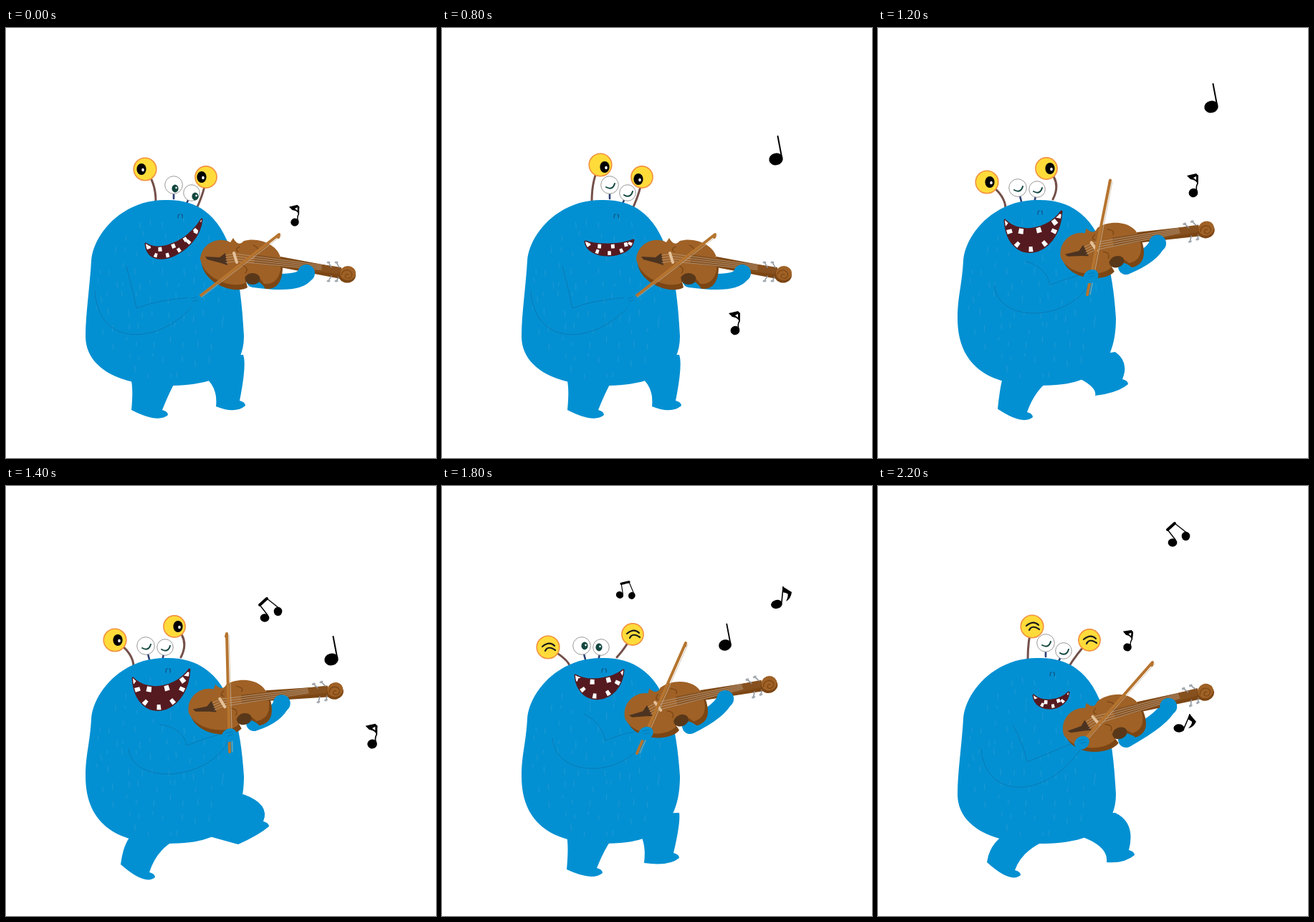
These frames come from a looping animation (600 px wide and 600 px high, 2.4 s). An HTML page:

```html
<!DOCTYPE html>
<html lang="en">
<head>
<meta charset="utf-8">
<title>Monster fiddler</title>
<style>
html, body { margin: 0; width: 100%; height: 100%; overflow: hidden; background: #fff; }
svg { display: block; width: 100vw; height: 100vh; }
</style>
</head>
<body>
<svg id="stage" viewBox="0 0 600 600"></svg>
<script>
const STEP = 200;
const BLUE = '#0390d2', LINE = '#0a7ab6', WOOD = '#9f6126', DARK_WOOD = '#7c4614', LIPS = '#551a20';

const fill = (d, color) => `<path d="${d}" fill="${color}"/>`;
const line = (d, color, w = 1) =>
  `<path d="${d}" fill="none" stroke="${color}" stroke-width="${w}" stroke-linecap="round" stroke-linejoin="round"/>`;
const oval = (x, y, rx, ry, color, more = '') =>
  `<ellipse cx="${x}" cy="${y}" rx="${rx}" ry="${ry}" fill="${color}" ${more}/>`;

// Blend of two numbers, lists or poses.
function mix(a, b, t = .5) {
  if (typeof a === 'number') return a + (b - a) * t;
  if (Array.isArray(a)) return a.map((v, i) => mix(v, b[i], t));
  return Object.fromEntries(Object.keys(a).map(k => [k, mix(a[k], b[k], t)]));
}

// side: 0 faces right, 1 faces front; feet: heel and toe; bow: frog and tip;
// grip: place along the bow; violin: centre and turn; hold: place along the neck
const rest = { side: 0, feet: [[175, 533], [226, 540], [293, 528], [334, 527]], shoulder: [168, 333], elbow: [182, 391],
  violin: [327, 330, 0], hold: 92, bow: [267, 377, 381, 288], grip: -.04 };
const play = { side: 1, feet: [[174, 535], [224, 540], [282, 526], [331, 519]], shoulder: [198, 318], elbow: [228, 355],
  violin: [311, 314, -19.5], hold: 85, bow: [272, 373, 340, 219], grip: .18 };
const kick = { side: 1, feet: [[160, 528], [208, 546], [324, 500], [367, 475]], shoulder: [215, 333], elbow: [252, 362],
  violin: [311, 310, -14.5], hold: 73, bow: [312, 371, 308, 206], grip: .14 };
const walk = { side: 0, feet: [[152, 525], [199, 543], [319, 525], [358, 515]], shoulder: [188, 333], elbow: [208, 385],
  violin: [314, 333, -22.8], hold: 94, bow: [290, 352, 383, 246], grip: -.06 };
const swing = mix(play, kick), turn = mix(kick, walk);

// Mouth: two corners, sag of the upper and of the lower lip.
const grin = [195, 301, 273, 267, 17, 33], calm = [200, 298, 267, 296, 5, 20], wide = [178, 274, 259, 263, 11, 40],
  huge = [177, 268, 256, 256, 18, 50], glad = [186, 264, 253, 257, 9, 36], small = [217, 292, 266, 288, 9, 20];

// Gaze: pupil shift of the left eye, of the right eye, and down; null is shut.
const crossed = [6, -5, 3], ahead = [4, 5, 0], low = [2, 5, 5], inward = [4, -3, 0];
const aside = [152, 215, 235, 196], perked = [221, 191, 279, 208], spread = [148, 225, 266, 207];

const lone = [['flagL', 403, 271, .9, 0]];
const pair = [['quarter', 466, 183, 1, 0], ['flagL', 409, 422, 1, 0]];

// pose, mouth, big eyes, their gaze, small eyes' gaze, notes [kind, x, y, size, turn]
const steps = [
  [rest, grin, [194, 197, 279, 208], [-5, -6, 0], low, lone],
  [walk, grin, perked, crossed, low, pair],
  [rest, grin, [235, 189, 302, 228], [3, 4, 3], low, lone],
  [walk, calm, perked, crossed, null, pair],
  [rest, calm, perked, crossed, null, pair],
  [play, wide, aside, ahead, null, [['quarter', 429, 143, 1, 0], ['flagL', 308, 203, .8, 0]]],
  [swing, huge, aside, ahead, null, [['quarter', 465, 110, 1, 0], ['flagL', 440, 230, 1, 0]]],
  [kick, huge, aside, ahead, null, [['quarter', 454, 242, 1, 0], ['flagL', 511, 360, 1.05, 0], ['double', 361, 184, 1, 0]]],
  [swing, wide, aside, ahead, null, [['quarter', 425, 232, 1, 0], ['flagR', 475, 260, 1, 0], ['double', 303, 184, 1, 0]]],
  [play, glad, spread, null, inward, [['quarter', 395, 222, .92, 0], ['flagR', 467, 165, 1, 0], ['double', 248, 152, .82, 29]]],
  [turn, glad, spread, null, inward, [['flagR', 558, 200, 1, 0], ['double', 46, 172, 1, 20]]],
  [walk, small, [215, 196, 295, 215], null, null, [['flagL', 348, 225, .9, 5], ['flagR', 420, 338, .95, 18], ['double', 411, 79, 1, 0]]]
];

const shapes = {
  quarter: oval(0, 0, 9.8, 8.3, '#000', 'transform="rotate(-15)"') + line('M8,-3L2.5,-32', '#000', 2),
  flagL: oval(0, 0, 6.4, 6.2, '#000', 'transform="rotate(-20)"') +
    line('M5,-2Q3,-8 6,-13V-24', '#000', 1.6) + fill('M-9,-24L4,-27L7,-24L6,-11Q5,-18 -4,-19Z', '#000') +
    fill('M0,-21L4,-23V-18Z', '#fff'),
  flagR: oval(0, 0, 8, 6, '#000', 'transform="rotate(-15)"') +
    line('M7,-3L9,-24', '#000', 1.6) + fill('M8,-25Q16,-20 21,-17Q20,-8 13,-4Q17,-12 15,-15L8,-17Z', '#000'),
  double: oval(0, 0, 6.4, 5.8, '#000') + oval(18.5, -9, 5.8, 6.2, '#000') +
    line('M4,-4L-7,-18L3,-27L22,-12', '#000', 1.4) + line('M-7,-18L3,-27', '#000', 4)
};
const note = ([kind, x, y, s, r]) =>
  `<g transform="translate(${x} ${y}) rotate(${r}) scale(${s})">${shapes[kind]}</g>`;

// Fur: short strokes on a loose grid, kept inside the belly.
let seed = 7;
const rnd = () => (seed = seed * 16807 % 2147483647) / 2147483647;
let hairs = '';
for (let y = 262; y < 490; y += 21) {
  for (let x = 122; x < 325; x += 19) {
    const hx = x + rnd() * 14, hy = y + rnd() * 14, len = 4 + rnd() * 5;
    if (((hx - 221) / 97) ** 2 + ((hy - 372) / 116) ** 2 < 1) hairs += `M${hx},${hy}l${rnd() * 2 - 1},${len}`;
  }
}
const fur = line(hairs, '#259bd4', .8);

// Egg-shaped trunk; the belly sits higher when facing front.
function trunk(side) {
  const belly = 430 - 25 * side;
  return fill(`M222,240C300,238 326,305 332,${belly}C332,485 285,499 225,499` +
    `C160,499 111,475 111,${belly}C111,${belly - 30} 117,360 119,325C121,290 160,240 222,240Z`, BLUE);
}
function leg([bx, by], [fx, fy], [hx, hy], [tx, ty]) {
  const ax = tx - 8, ay = ty - 7;
  return fill(`M${bx},${by}Q${hx + 3},${by + 14} ${hx},${hy}Q${tx - 14},${ty + 12} ${tx},${ty}` +
    `Q${tx},${ty - 5} ${ax},${ay}Q${ax + 10},${fy + 14} ${fx},${fy}L${bx + 20},${by - 30}Z`, BLUE);
}
const legs = ([heelL, toeL, heelR, toeR]) =>
  leg([174, 488], [236, 494], heelL, toeL) +
  leg([277, 487], [331, Math.min(456, toeR[1] - 45)], heelR, toeR);

const wood = 'M271,322C273,300 297,290 313,299L317,293Q324,306 332,297C352,291 383,302 384,326' +
  'C384,350 374,358 360,357Q350,340 333,347L335,355C320,365 276,352 271,322Z';
let strings = '', pegs = '';
for (let i = 0; i < 4; i++) {
  const px = 454 + 11 * (i % 2), up = i < 2 ? -1 : 1, tip = px - 4, ty = 340 + 13 * up;
  strings += `M307,${317 + i * 3.5}L320,${315 + i * 3.5}L440,${331 + i * 2}`;
  pegs += line(`M${px},${340 + 6 * up}L${tip},${ty}`, '#8c9298', 1.5) + oval(tip, ty, 2.6, 1.6, '#a4aab0');
}
const fiddle =
  `<g transform="translate(2 7)">${fill(wood, DARK_WOOD)}</g>` + fill(wood, WOOD) +
  oval(344, 350, 10.5, 8, '#59381a') +
  line('M326,305Q318,309 324,312M330,331Q340,336 334,342M345,303Q355,308 350,312', DARK_WOOD, 1.3) +
  fill('M383,319L468,335L467,350L383,334Z', DARK_WOOD) +
  fill('M348,316L468,334L467,344L346,328Z', '#87511f') +
  fill('M278,319L298,320L306,314L309,331L300,328L281,323Z', '#4c3320') +
  line(strings, '#b89c80', .8) + line('M318,314L322,327', '#e4c199', 4) + pegs +
  oval(476, 345, 12, 10.5, DARK_WOOD) + oval(477, 342, 11, 10, WOOD) +
  line('M468,344Q470,337 477,338Q485,341 482,347Q477,352 473,347Q474,342 478,344', DARK_WOOD, 1.2);

function music({ shoulder: [sx, sy], elbow: [ex, ey], violin: [vx, vy, deg], hold, bow, grip }) {
  const a = deg * Math.PI / 180, [x1, y1, x2, y2] = bow;
  const fx = vx + hold * Math.cos(a) - 12 * Math.sin(a), fy = vy + hold * Math.sin(a) + 12 * Math.cos(a);
  const gx = mix(x1, x2, grip), gy = mix(y1, y2, grip), px = sx - 44, py = sy + 34;
  return line(`M${sx},${sy}Q${ex - 5},${ey - 25} ${ex},${ey}Q${ex + 30},${ey - 12} ${gx},${gy - 5}` +
      `M${px},${py}C${px + 5},${ey + 55} ${ex + 30},${ey + 52} ${gx},${gy + 6}`, LINE) +
    line(`M346,${vy + 21}Q${fx - 8},${fy + 18} ${fx},${fy}`, BLUE, 22) +
    `<g transform="translate(${vx - 327} ${vy - 330}) rotate(${deg} 327 330)">${fiddle}</g>` +
    oval(fx, fy, 12, 12, BLUE) +
    line(`M${x1 + 4},${y1}L${x2 + 3},${y2 + 2}`, '#c9b79c', .8) +
    line(`M${x1},${y1}L${x2},${y2}l-1,4`, '#b5742f', 4) +
    oval(gx, gy, 11, 9, BLUE, `transform="rotate(-30 ${gx} ${gy})"`) +
    line(`M${gx - 4},${gy - 3}l8,-2m-6,6l7,-2`, LINE);
}

function bigEye(x, y, r, dx, dy) {
  const face = oval(x, y, r, r, '#ffdb3a', 'stroke="#f2913f" stroke-width="1.6"');
  if (dx === undefined)
    return face + line(`M${x - 8},${y - 1}Q${x + 2},${y - 9} ${x + 9},${y - 2}M${x - 4},${y + 5}Q${x},${y - 3} ${x + 10},${y + 4}`, '#1a1a1a', 2.2);
  return face + oval(x + dx, y + dy, 6.6, 8, '#000') + oval(x + dx + 2, y + dy + 1, 1.8, 2.2, '#fff');
}
function smallEye(x, y, r, dx, dy) {
  const face = oval(x, y, r, r, '#fff', 'stroke="#999" stroke-width="1"');
  if (dx === undefined) return face + line(`M${x - 5},${y + 3}Q${x + 4},${y + 8} ${x + 7},${y - 2}`, '#12463f', 2);
  return face + oval(x + dx, y + dy, 4.6, 5.4, '#12463f') + oval(x + dx + 1.5, y + dy - 1, 1.2, 1.4, '#fff');
}
function eyes(side, big, gaze, peek) {
  const roots = mix([209, 242, 265, 254], [178, 252, 244, 239], side);
  const white = mix([234, 219, 259, 230], [195, 223, 222, 225], side);
  let stalks = '', balls = '';
  for (const i of [0, 1]) {
    const [bx, by, x, y, wx, wy] = [roots, big, white].flatMap(p => [p[2 * i], p[2 * i + 1]]);
    const lean = mix(i ? -9 : 0, i ? -4 : 5, side);
    stalks += line(`M${bx},${by}Q${bx + 13 * i},${y + 18} ${x},${y}`, '#74504a', 3) +
      line(`M${wx},${wy}L${wx + lean},${wy + 19}`, '#2d3f74', 2.6);
    balls += smallEye(wx, wy, 12.3 - i, peek?.[i], peek?.[2]) + bigEye(x, y, 15.8 - i * .7, gaze?.[i], gaze?.[2]);
  }
  return stalks + balls;
}

// Crescent with square teeth dashed along its edge.
function smile([x1, y1, x2, y2, up, down]) {
  const lip = (t, sag) => `${mix(x1, x2, t)},${mix(y1, y2, t) + sag / .75}`;
  const d = `M${x1},${y1}C${lip(.25, up)} ${lip(.75, up)} ${x2},${y2}C${lip(.95, down)} ${lip(.05, down)} ${x1},${y1}Z`;
  const tooth = 3.5 + (down - up) / 12;
  return `<clipPath id="lips"><path d="${d}"/></clipPath>` + fill(d, LIPS) + line(d, LIPS, 3) +
    `<path d="${d}" clip-path="url(#lips)" fill="none" stroke="#fff" stroke-width="${tooth * 2.4}" stroke-dasharray="${tooth} ${tooth * 2.8}"/>`;
}

function scene([pose, mouth, big, gaze, peek, notes]) {
  const [nx, ny] = mix([243, 262], [226, 257], pose.side);
  return eyes(pose.side, big, gaze, peek) + trunk(pose.side) + legs(pose.feet) + fur +
    line(`M${nx - 3},${ny + 3}q0,-5 2,-5M${nx + 2},${ny - 2}q2,1 1,5`, '#12598c', 1.4) +
    smile(mouth) + music(pose) + notes.map(note).join('');
}

const stage = document.getElementById('stage');
const scenes = steps.map(scene);
const start = performance.now();
let shown = -1;
function tick() {
  const i = Math.floor(Math.max(0, performance.now() - start) / STEP) % scenes.length;
  if (i !== shown) stage.innerHTML = scenes[shown = i];
  requestAnimationFrame(tick);
}
tick();
</script>
</body>
</html>
```
